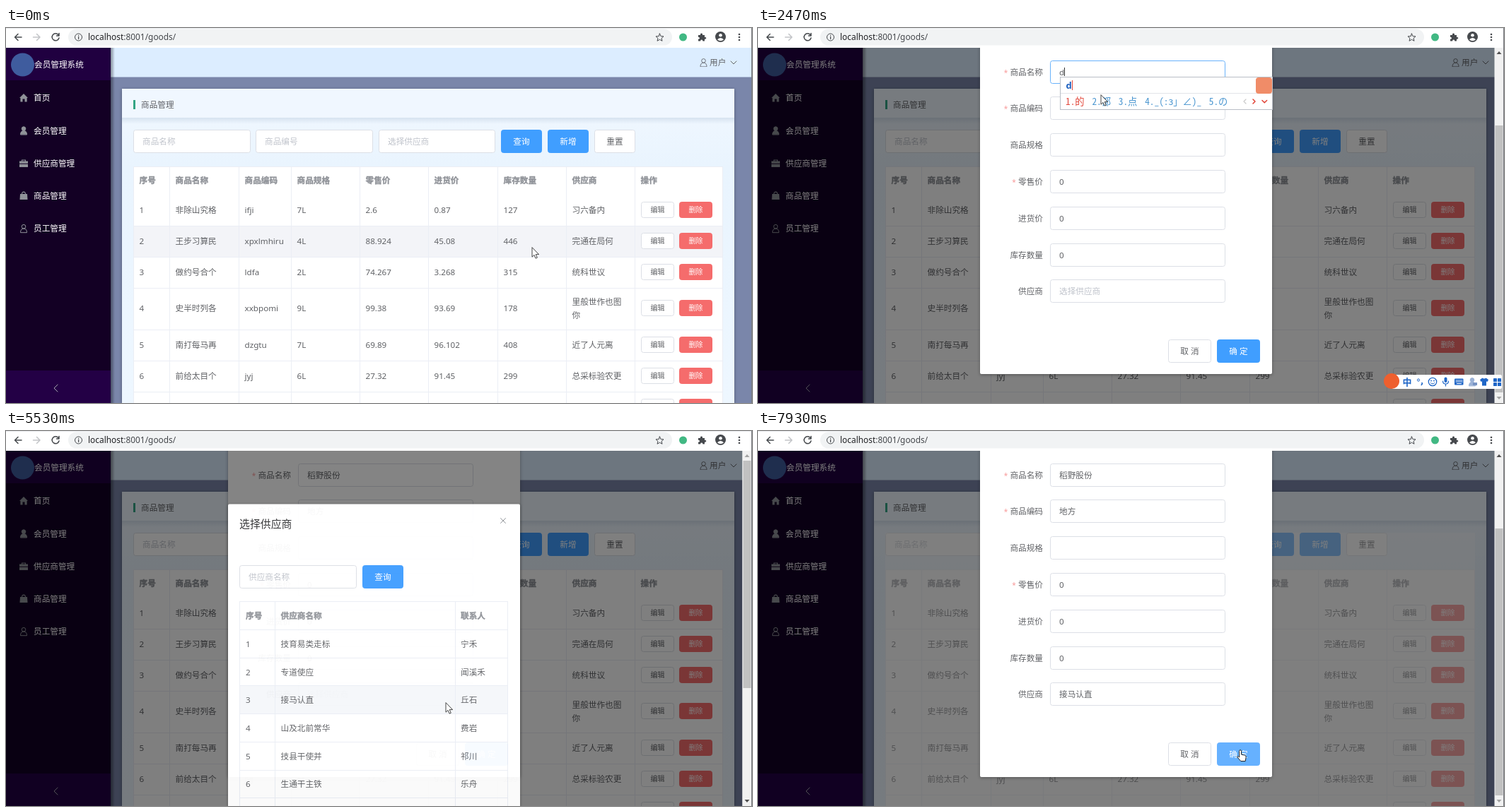
An HTML page that plays this animation: 1055 px wide and 531 px high, repeating every 8 s.

```html
<!DOCTYPE html>
<html lang="zh-CN">
<head>
<meta charset="utf-8">
<style>
html,body{margin:0;width:100%;height:100%;overflow:hidden;background:#fff}
svg{display:block;width:100%;height:100%}
text{font-family:'Noto Sans','Noto Sans CJK SC',sans-serif;white-space:pre}
.ime text{font-family:'Noto Sans Mono CJK SC','Noto Sans CJK SC',monospace}
.ime .keys{font-family:'Noto Sans',sans-serif}
.card{filter:drop-shadow(0 1px 2px rgba(0,0,0,.35))}
</style>
</head>
<body>
<svg viewBox="0 0 1055 531" xmlns="http://www.w3.org/2000/svg">
<defs>
<linearGradient id="side" x1="0" x2="1" y1="0" y2="0"><stop offset="0" stop-opacity=".4"/><stop offset="1" stop-opacity="0"/></linearGradient>
<linearGradient id="drop" x1="0" x2="0" y1="0" y2="1"><stop offset="0" stop-color="#9db4cc" stop-opacity=".3"/><stop offset="1" stop-color="#9db4cc" stop-opacity="0"/></linearGradient>
<linearGradient id="body" x1="0" x2="0" y1="0" y2="1"><stop offset="0" stop-color="#f2f8ff"/><stop offset=".25" stop-color="#e9f4fe"/><stop offset="1" stop-color="#eef7ff"/></linearGradient>
</defs>
<g id="page"></g><g id="form"></g><g id="picker"></g><g id="chrome"></g><g id="ime"></g><g id="cursor"></g>
</svg>
<script>
const LOOP = 8000, STEP = 1000 / 15;
const BLUE = '#409eff', LIGHT = '#66b1ff', RED = '#f56c6c', GREY = '#606266', EDGE = '#dcdfe6', HINT = '#c0c4cc', RULE = '#ebeef5';

const rect = (x, y, w, h, fill, more = '') => `<rect x="${x}" y="${y}" width="${w}" height="${h}" fill="${fill}" ${more}/>`;
const path = (d, color, w = 1.2, fill = 'none') => `<path d="${d}" stroke="${color}" stroke-width="${w}" fill="${fill}" stroke-linecap="round" stroke-linejoin="round"/>`;
const solid = (d, fill) => `<path d="${d}" fill="${fill}"/>`;
const dot = (x, y, r, fill, more = '') => `<circle cx="${x}" cy="${y}" r="${r}" fill="${fill}" ${more}/>`;
const at = (x, y, s, more = '') => `<g transform="translate(${x} ${y})" ${more}>${s}</g>`;
// y is the middle of the line
const text = (x, y, s, fill = GREY, size = 11.65, more = '') =>
  `<text x="${x}" y="${y + size * .37}" font-size="${size}" fill="${fill}" ${more}>${s}</text>`;
const bold = 'font-weight="700"', mid = 'text-anchor="middle"', end = 'text-anchor="end"';
const heading = (x, y, s) => text(x, y, s, '#909399', 11.65, bold + ' stroke="#909399" stroke-width=".35"');

function box(x, y, w, h, fill = '#fff', edge = EDGE) {
  return rect(x + .5, y + .5, w - 1, h - 1, fill, `rx="3" stroke="${edge}"`);
}
function field(x, y, w, value, hint, edge) {
  return box(x, y, w, 33, '#fff', edge) + text(x + 13, y + 16.5, value || hint || '', value ? GREY : HINT);
}
function button(x, y, w, h, label, fill, size) {
  return box(x, y, w, h, fill || '#fff', fill || EDGE) + text(x + w / 2, y + h / 2, label, fill ? '#fff' : GREY, size, mid);
}
const tri = (x, y, d, fill) => solid(`M${x - 3.5} ${y + 2 * d}h7l-3.5 ${-4 * d}z`, fill);
function scrollbar(y, h, atTop) {
  return rect(1041.5, 28, 13, 503, '#f1f1f1') + rect(1042.5, y, 11, h, '#c1c1c1') +
    tri(1048, 35, 1, atTop ? '#a3a3a3' : '#505050') + tri(1048, 524, -1, atTop ? '#505050' : '#a3a3a3');
}

// ---- main page
const cols = [180, 231, 329, 403, 500, 597, 695, 792, 889];
const heads = ['序号', '商品名称', '商品编码', '商品规格', '零售价', '进货价', '库存数量', '供应商', '操作'];
const rowTop = [236, 280, 324, 368, 427, 471, 515, 559];
const goods = [
  '非除山究格,ifji,7L,2.6,0.87,127,习六备内',
  '王步习算民,xpxlmhiru,4L,88.924,45.08,446,完通在局何',
  '做约号合个,ldfa,2L,74.267,3.268,315,统科世议',
  '史半时列各,xxbpomi,9L,99.38,93.69,178,里般世作也图|你',
  '南打每马再,dzgtu,7L,69.89,96.102,408,近了人元离',
  '前给太目个,jyj,6L,27.32,91.45,299,总采标验农更',
  ',,,,,,'
].map((r, i) => [i < 6 ? i + 1 : '', ...r.split(',')]);

const person = (c, fill) => path('M-4.5 5.5q0-5.2 4.5-5.2t4.5 5.2z', c, 1, fill) + `<circle cy="-2.6" r="2.8" fill="${fill}" stroke="${c}"/>`;
const I = '#909399';
const icons = [
  solid('M-6 0L0-6L6 0H4.6V5.5H1.5V1.5H-1.5V5.5H-4.6V0z', I),
  person(I, I),
  solid('M-6-3H-3V-5H3V-3H6V.3H-6zM-6 1.3H6V5.5H-6zM-2-4V-3H2V-4z', I),
  solid('M-5-2.5H-3q0-3.5 3-3.5t3 3.5H5L5.5 5.5H-5.5zM-2-2.5H2q0-2.3-2-2.3t-2 2.3z', I),
  person(I, 'none')
];
const menu = ['首页', '会员管理', '供应商管理', '商品管理', '员工管理'];

function sidebar() {
  return rect(0, 28, 148, 503, '#130024') + rect(0, 28, 148, 46, '#200040') + rect(0, 485, 148, 46, '#230045') +
    dot(23.5, 52, 16.5, '#3f5c9e') + text(40, 52, '会员管理系统', '#fff') +
    menu.map((m, i) => at(25, 99 + i * 46.2, icons[i]) + text(39, 99 + i * 46.2, m, '#fff')).join('') +
    path('M73 505l-5 5l5 5', '#a8a3b0', 1) + rect(148, 28, 6, 503, 'url(#side)');
}

function table(hover) {
  let s = rect(180, 196, 834, 335, '#fff');
  if (hover >= 0) s += rect(180, rowTop[hover], 834, rowTop[hover + 1] - rowTop[hover], '#f3f4f8');
  rowTop.forEach((y, i) => { if (i) s += rect(180, y, 834, 1, RULE); });
  s += cols.map(x => rect(x, 196, 1, 335, RULE)).join('') + rect(1013, 196, 1, 335, RULE) + rect(180, 196, 834, 1, RULE);
  s += heads.map((h, i) => heading(cols[i] + 8.5, 216, h)).join('');
  goods.forEach((row, r) => {
    const y = r == 3 ? 397 : rowTop[r] + 22;
    row.forEach((v, c) => {
      const lines = String(v).split('|');
      lines.forEach((l, k) => s += text(cols[c] + 8.5, y + (k - (lines.length - 1) / 2) * 19, l));
    });
    s += button(898, y - 12, 47, 23, '编辑', '', 10) + button(952, y - 12, 47, 23, '删除', RED, 10);
  });
  return s;
}

function page({ hover, addHot, mask, loading }) {
  return rect(148, 28, 907, 503, '#7a86aa') + rect(148, 28, 907, 41.5, '#dcedff') +
    at(986.5, 49, person(GREY, 'none'), 'opacity=".9"') + text(995, 49, '用户') + path('M1025 47l4 4l4-4', GREY, 1) +
    rect(164, 86, 866, 445, 'url(#body)', 'class="card"') + rect(164, 86, 866, 41, '#f0f7ff') + rect(164, 127, 866, 9, 'url(#drop)') +
    rect(180, 102, 3, 13, '#35a585') + text(191, 109, '商品管理') +
    field(180, 144, 166, '', '商品名称') + field(353, 144, 166, '', '商品编号') + field(527, 144, 165, '', '选择供应商') +
    button(700, 144, 58, 33, '查询', BLUE) + button(766, 144, 58, 33, '新增', addHot ? LIGHT : BLUE) + button(832, 144, 58, 33, '重置') +
    table(hover) + (loading ? rect(180, 144, 834, 387, '#fff', 'opacity=".4"') : '') + sidebar() +
    (mask ? rect(0, 28, 1055, 503, '#000', 'opacity=".5"') : '');
}

// ---- form dialog
const labels = ['商品名称', '商品编码', '商品规格', '零售价', '进货价', '库存数量', '供应商'];
const required = [0, 1, 3];
const fieldTop = i => Math.round(45.5 + i * 51.8);
function form({ show, dy, values, focus, over, okHot }) {
  if (!show) return '';
  const rows = labels.map((l, i) => {
    const y = fieldTop(i) + 16.5, edge = i == focus ? '#69b2fb' : i == over ? HINT : EDGE;
    return text(403, y, l, GREY, 11.65, end) +
      (required.includes(i) ? text(397 - l.length * 11.65, y + .5, '*', RED, 10, mid + ' opacity=".7"') : '') +
      field(413, fieldTop(i), 248, values[i], i == 6 ? '选择供应商' : '', edge);
  }).join('');
  return at(0, dy, rect(314, 20, 413, 470, '#fff', 'rx="2" class="card"') + rows +
    button(580, 441, 61, 33, '取 消') + button(649, 441, 61, 33, '确 定', okHot ? LIGHT : BLUE),
    `opacity="${dy ? .985 : 1}"`) + scrollbar(138, 378, false);
}

// ---- supplier dialog
const suppliers = ['技育易类走标', '专道使应', '接马认直', '山及北前常华', '技县干使并', '生通干主铁'];
const contacts = ['宁禾', '闻溪禾', '丘石', '费岩', '祁川', '乐舟'];
const LINE = 39.7, LIST = 281.5;
function picker({ alpha, tint }) {
  if (!alpha) return '';
  let s = rect(314, 28, 413, 462, '#000', 'opacity=".5"') + rect(314, 103.5, 413, 440, '#fff', 'rx="2" class="card"') +
    text(330, 131, '选择供应商', '#303133', 14.9) + path('M699.5 123.5l7 7m0-7l-7 7', '#909399', 1) +
    field(330, 190, 166, '', '供应商名称') + button(504, 190, 58, 33, '查询', BLUE);
  for (const i in tint) s += rect(330, LIST + i * LINE, 380, LINE, tint[i]);
  s += rect(330, 241, 380, 1, RULE) + [330, 380, 635, 709].map(x => rect(x, 241, 1, 290, RULE)).join('');
  s += heading(339, 262, '序号') + heading(388.5, 262, '供应商名称') + heading(643, 262, '联系人');
  for (let i = 0; i < 7; i++) {
    const y = LIST + i * LINE;
    s += rect(330, Math.round(y - .5), 380, 1, RULE);
    if (i < 6) s += text(339, y + 20, i + 1) + text(388.5, y + 20, suppliers[i]) + text(643, y + 20, contacts[i]);
  }
  return `<g opacity="${alpha}">${s}</g>` + scrollbar(42, 322, true);
}

// ---- browser bar
function chrome() {
  const K = '#46494d';
  return rect(0, 0, 1055, 28, '#fff') + rect(0, 0, 1055, .7, '#dee1e6') + rect(88, 1.5, 854, 23, '#f1f3f4', 'rx="11.5"') +
    path('M22 13H12.5m4.5-4.5L12.5 13l4.5 4.5', K, 1.5) + path('M38.5 13H48m-4.5-4.5L48 13l-4.5 4.5', '#c3c5c8', 1.5) +
    path('M74 9.6A5 5 0 1 0 75 14M75 7.5V11H71.5', K, 1.5) +
    dot(102.5, 13, 5, 'none', `stroke="${K}"`) + rect(102, 12, 1.2, 4, K) + rect(102, 10, 1.2, 1.2, K) +
    text(116, 13, 'localhost<tspan fill="#44474b">:8001/goods/</tspan>', '#202124', 11.9) +
    path('M924.5 8l1.5 3.6 4 .3-3 2.6 1 3.8-3.5-2-3.5 2 1-3.8-3-2.6 4-.3z', K, 1) +
    dot(957.5, 13, 5.5, '#41b883') +
    solid('M979 10H982q-.4-2.6 1.5-2.6T985 10H988V13q2.3-.3 2.3 1.3T988 15.7V18.5H985.3q0-2-1.6-2t-1.6 2H979V15.7q2 0 2-1.5t-2-1.5z', K) +
    dot(1010.5, 12.5, 7.5, K) + dot(1010.5, 10.3, 2.3, '#fff') + solid('M1006 16.5q1.5-2.5 4.5-2.5t4.5 2.5q-4.5 3.4-9 0z', '#fff') +
    [9, 13, 17].map(y => dot(1037, y, 1.3, K)).join('') + rect(1054, 0, 1, 531, '#77797f');
}

// ---- input method
function toolbar() {
  const B = '#1f66c7';
  return rect(896, 491, 156, 20, '#fff', 'rx="2"') + dot(896, 500, 11, '#ee5f2e') +
    text(918, 501, '中', B, 13, bold + ' ' + mid) + dot(934, 498.5, 1.6, 'none', `stroke="${B}"`) + path('M939 502.5q1 1.5-.8 2.8', B, 1.6) +
    dot(954, 501, 5.7, 'none', `stroke="${B}" stroke-width="1.3"`) + dot(952, 499.5, .9, B) + dot(956, 499.5, .9, B) + path('M951.2 502.5q2.8 3 5.6 0', B, 1) +
    rect(970.5, 494.5, 4, 7.5, B, 'rx="2"') + path('M968.5 500q0 4 4 4t4-4M972.5 504v3', B) +
    rect(985, 496.5, 12.5, 9, B, 'rx="1"') + [499, 501].map(y => path(`M987 ${y}h9`, '#fff', .8)).join('') + path('M988.5 503.5h6', '#fff', 1) +
    at(1010, 501, person('#9bb2d6', '#9bb2d6')) + rect(1011, 502, 6, 4, '#7894c4') +
    solid('M1024.5 495.5q2.5 2 5 0L1033 498l-1.5 3-1.5-.7V506.5H1024V500.3l-1.5.7L1021 498z', B) +
    [[1040, 496], [1046, 496], [1040, 502], [1046, 502]].map(([x, y]) => rect(x, y, 5, 5, B, 'rx=".6"')).join('');
}
// keys: composed letters, picks: candidates
function panel(top, w, keys, picks, caret) {
  const r = 427 + w;
  let x = 435;
  const width = s => [...s].reduce((a, c) => a + (c > '\u2000' ? 1 : .5), 0) * 13.3;
  const list = picks.map((p, i) => {
    const s = `${i + 1}.${p}`, out = text(x, top + 35, s, i ? '#4a96d0' : '#e2483c', 13.3);
    x += width(s) + 10.8;
    return out;
  }).join('');
  const cx = 437 + keys.length * 7 - (keys.match(/['f]/g) || []).length * 2.4;
  return rect(427.5, top + .5, w - 1, 46, '#fff', 'stroke="#b9bec6"') + rect(428, top + 23, w - 2, 1, '#e2e4e8') +
    text(435.5, top + 11.7, keys, '#1b5fbf', 13, bold + ' class="keys"') +
    rect(cx, top + 5, 1, 14, '#e2483c') + rect(r - 24, top + 1, 23, 23, '#f08c68', 'rx="4"') + list +
    path(`M${r - 38} ${top + 32}l-3 3l3 3`, '#c9c9c9') + path(`M${r - 28} ${top + 32}l3 3l-3 3`, '#e2483c', 1.6) +
    path(`M${r - 15} ${top + 33.5}l3.3 3.3l3.3-3.3`, '#e2483c', 1.6) + rect(caret, top - 13, 1, 12, '#333');
}
// time, composed letters, letters in the field, panel top and width, candidates, caret
const typing = [
  [2470, 'd', 'd', 69, 301, ['的', '都', '点', '_(:з」∠)_', 'の'], 433],
  [2600, "d'y", 'dy', 69, 308, ['第一', '打印', '地狱', '电影', '多余'], 439],
  [2670, "d'y'g", 'dyg', 69, 301, ['第一个', '打一个', '多一个'], 446],
  [2730, "d'y'g'f", 'dygf', 69, 301, ['稻野股份', '第一股份'], 450],
  [3000],
  [3670, 'd', 'd', 121, 301, ['的', '都', '点', '_(:з」∠)_', 'の'], 433],
  [3730, "d'f", 'df', 121, 308, ['地方', '带粉', '巅峰', '对方', '掉分'], 437],
  [4130]
];

// ---- pointer: time, x, y, shape
const track = [
  [0, 744, 311, 'arrow'], [70, 744, 311, 'arrow'], [600, 784, 162, 'hand'], [670, 785, 155, 'hand'], [1329, 785, 155, 'hand'],
  [1330, 672, 173, 'arrow'], [1530, 672, 173, 'arrow'], [1730, 640, 158, 'beam'], [1800, 640, 158, 'beam'], [2200, 487, 70, 'beam'],
  [2330, 485, 72, 'beam'], [2470, 485, 95, 'arrow'], [3200, 485, 95, 'beam'], [3530, 477, 120, 'beam'], [3600, 477, 120, 'beam'],
  [3670, 477, 135, 'beam'], [4130, 477, 135, 'beam'], [4930, 622, 385, 'beam'], [5529, 622, 385, 'beam'], [5530, 622, 385, 'arrow'],
  [5869, 622, 385, 'arrow'], [5870, 505, 270, 'arrow'], [5930, 505, 270, 'arrow'], [6200, 482, 378, 'arrow'], [7000, 482, 378, 'arrow'],
  [7400, 722, 470, 'arrow'], [7600, 690, 458, 'hand'], [7730, 682, 452, 'hand'], [8001, 682, 452, 'hand']
];
const shapes = {
  arrow: path('M0 0V13.2L3 10.4L5.1 15.2L7.3 14.2L5.2 9.6H9.2z', '#333', .9, '#fff'),
  beam: path('M-3.5-7h2.5q1 0 1 1q0-1 1-1h2.5M0-6V6M-3.5 7h2.5q1 0 1-1q0 1 1 1h2.5', '#000', 1.3),
  hand: path('M-1.5 1.2a1.5 1.5 0 0 1 3 0V6l5 1.2q2 .6 1.7 2.6L7.2 15.5H.8L-4.5 9.4q.5-1.8 3 .3z', '#222', 1, '#fff')
};
function pointer(t) {
  const i = track.findIndex(k => k[0] > t), [a, b] = [track[i - 1], track[i]];
  let u = (t - a[0]) / (b[0] - a[0]);
  u = u * u * (3 - 2 * u);
  return { x: a[1] + (b[1] - a[1]) * u, y: a[2] + (b[2] - a[2]) * u, shape: a[3] };
}

const cache = {};
function put(id, html) {
  if (cache[id] !== html) document.getElementById(id).innerHTML = cache[id] = html;
}
const inside = (p, x, y, w, h) => p.x >= x && p.x < x + w && p.y >= y && p.y < y + h;
const between = (t, a, b) => t >= a && t < b;

function draw(t) {
  const p = pointer(t), open = t >= 1330;
  const [, keys, letters, top, w, picks, caret] = typing.filter(k => k[0] <= t).pop() || [];
  const onAdd = !open && inside(p, 766, 144, 58, 33);
  const onOk = t > 7000 && inside(p, 649, 441, 61, 33);

  put('page', page({
    hover: open ? -1 : rowTop.findIndex((y, i) => inside(p, 180, y, 834, rowTop[i + 1] - y)),
    addHot: onAdd || between(t, 1330, 1600), mask: open, loading: t >= 7930
  }));

  const values = [
    t >= 3000 ? '稻野股份' : letters || '',
    t >= 4130 ? '地方' : t >= 3670 ? letters : '',
    '', '0', '0', '0', t >= 6800 ? suppliers[2] : ''
  ];
  const over = between(t, 5530, 6930) || keys ? -1 : labels.findIndex((l, i) => inside(p, 413, fieldTop(i), 248, 33));
  put('form', form({
    show: open, dy: t < 1600 ? -.6 : 0, values, over, okHot: onOk,
    focus: between(t, 2200, 3460) ? 0 : between(t, 3460, 5530) ? 1 : -1
  }));

  let tint = {};
  if (between(t, 5870, 6000)) tint = { 0: '#eef4fb', 2: '#f9fafa' };
  else if (t >= 6400) tint = { 2: '#ecf5ff' };
  else {
    const r = Math.floor((p.y - LIST) / LINE);
    if (r >= 0) tint[r] = '#f5f7fa';
  }
  const alpha = t < 5530 ? 0 : t < 5870 ? .96 : t < 6800 ? 1 : t < 6930 ? .4 : 0;
  put('picker', picker({ alpha, tint }));

  put('ime', (between(t, 2330, 5270) ? toolbar() : '') + (keys ? `<g class="ime">${panel(top, w, keys, picks, caret)}</g>` : ''));
  put('cursor', at(p.x.toFixed(1), p.y.toFixed(1), p.shape == 'hand' && !onOk && !onAdd ? shapes.arrow : shapes[p.shape]));
}

put('chrome', chrome());
const start = performance.now();
// fifteen pictures a second, each on a whole hundredth
function tick() {
  const t = (performance.now() - start) % LOOP;
  draw(Math.round(Math.floor((t + 5) / STEP) * STEP / 10) * 10 % LOOP);
  requestAnimationFrame(tick);
}
tick();
</script>
</body>
</html>
```
